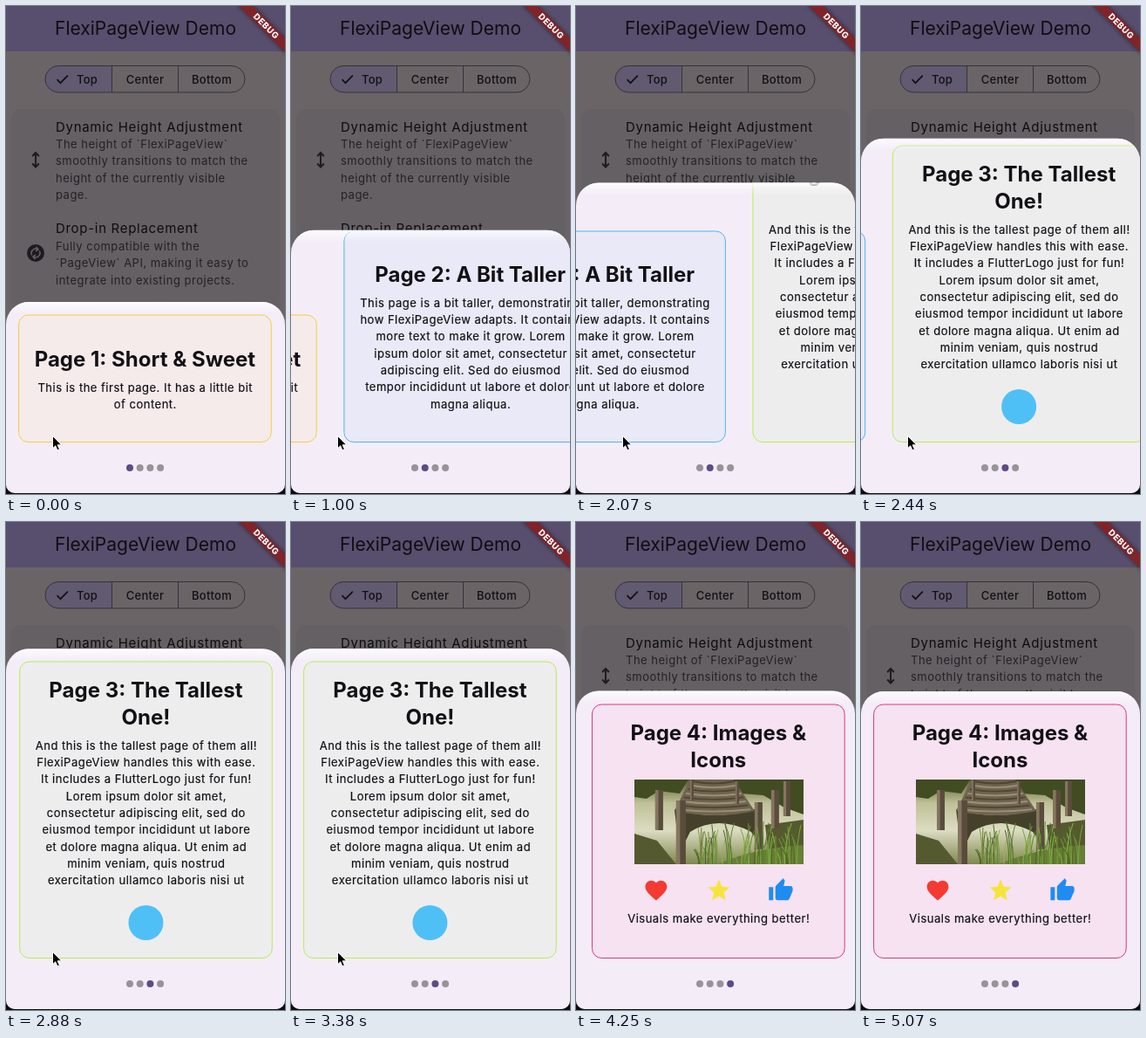
An HTML page for the animation above (5.13 s loop, 320 by 559 pixels).

```html
<!DOCTYPE html>
<html lang="en">
<head>
<meta charset="utf-8">
<title>FlexiPageView Demo</title>
<style>
  html, body { margin: 0; width: 100%; height: 100%; overflow: hidden; background: #0c0b0d; }
  svg { display: block; width: 320px; height: 559px; }
  text { font-family: Inter, Roboto, sans-serif; fill: #131116; }
  .bar { font-size: 21px; fill: #0f0d12; }
  .tab { font-size: 13px; font-weight: 500; letter-spacing: .25px; fill: #111014; }
  .item { font-size: 15px; letter-spacing: .7px; fill: #0d0c0e; }
  .note, .body { font-size: 13px; letter-spacing: .5px; }
  .note { fill: #242126; }
  .body { stroke: #131116; stroke-width: .2; }
  .head { font-size: 24px; font-weight: 700; }
  .mid { text-anchor: middle; }
  .debug { font-size: 9.8px; font-weight: 800; letter-spacing: .5px; fill: #fff; }
</style>
</head>
<body>
<svg viewBox="0 0 320 559">
  <defs>
    <clipPath id="window"><rect y="-20" width="320" height="578" rx="10"/></clipPath>
    <clipPath id="sheetClip"><rect class="sheet" width="320" height="600" rx="26"/></clipPath>
    <clipPath id="photoClip"><rect width="194" height="97"/></clipPath>
    <linearGradient id="pond" x2="0" y2="1">
      <stop offset="0" stop-color="#55622f"/>
      <stop offset=".28" stop-color="#bfc097"/>
      <stop offset=".6" stop-color="#dcdcc2"/>
      <stop offset="1" stop-color="#7f8850"/>
    </linearGradient>
    <linearGradient id="fade" x2="0" y2="1">
      <stop offset="0" stop-color="#fff"/>
      <stop offset=".3" stop-color="#fff" stop-opacity=".5"/>
      <stop offset="1" stop-color="#fff" stop-opacity="0"/>
    </linearGradient>
    <filter id="blur" x="-20%" y="-100%" width="140%" height="300%"><feGaussianBlur stdDeviation="2.8"/></filter>
  </defs>

  <g clip-path="url(#window)">
    <!-- dimmed app behind the sheet -->
    <rect width="320" height="559" fill="#6a6467"/>
    <rect width="320" height="52" fill="#584e6d"/>
    <text class="bar mid" x="160" y="33">FlexiPageView Demo</text>

    <path d="M121.5 68.5H60.5a15.2 15.2 0 0 0 0 30.4h61z" fill="#625a70"/>
    <g fill="none" stroke="#36323a">
      <rect x="45" y="68.5" width="229" height="30.4" rx="15.2"/>
      <path d="M121.5 68.5v30.4M197.5 68.5v30.4"/>
    </g>
    <path d="M58.5 84.2l4 4 8.3-8.6" fill="none" stroke="#111014" stroke-width="1.7"/>
    <text class="tab" x="81" y="88.5">Top</text>
    <text class="tab mid" x="159.5" y="88.5">Center</text>
    <text class="tab mid" x="236" y="88.5">Bottom</text>

    <rect x="6" y="118" width="308" height="460" rx="11" fill="#646063"/>
    <g id="list"></g>
    <path d="M34 168.5v15.5M30.2 172l3.8-4 3.8 4M30.2 180.5l3.8 4 3.8-4" fill="none" stroke="#1d1b20" stroke-width="1.9"/>
    <circle cx="34" cy="283" r="10" fill="#1d1b20"/>
    <g fill="none" stroke="#646063" stroke-width="1.5">
      <path d="M29.7 285.5a5 5 0 0 1 6.8-6.8M38.3 280.5a5 5 0 0 1-6.8 6.8"/>
      <path d="M34.5 276l2.5 2.8-3 2M33.5 290l-2.5-2.8 3-2"/>
    </g>

    <!-- bottom sheet -->
    <rect class="sheet" width="320" height="600" rx="26" fill="#f4edf8"/>
    <g clip-path="url(#sheetClip)">
      <g id="pages"></g>
      <rect class="sheet" width="320" height="14" fill="url(#fade)"/>
    </g>
    <g id="dots"></g>
    <path id="pointer" d="M53.5 492.5v14.3l3.2-3 2.2 5 2.5-1.1-2.2-4.9h4.5z" fill="#000" stroke="#fff"/>

    <g transform="translate(320.8 .8) rotate(45)">
      <rect x="-40" y="26" width="80" height="11.2" fill="#000" opacity=".5" filter="url(#blur)"/>
      <rect x="-40" y="26" width="80" height="11.2" fill="#80242a"/>
      <text class="debug mid" y="35">DEBUG</text>
    </g>
  </g>
</svg>

<script>
const LOOP = 5130, WIDTH = 321.2, CENTER = 159.4, PITCH = 19.35, OMEGA = 8;
const SWIPES = [0.573, 1.894, 3.449];   // start of each swipe, s
const POINTER_END = 4000;
const $ = id => document.getElementById(id);

const lines = (cls, x, y, pitch, rows) => rows.map((row, i) =>
  `<text class="${cls}" x="${x}" y="${y + i * pitch}">${row}</text>`).join('');
const head = (y, ...rows) => lines('head mid', CENTER, y, 31, rows);
const body = (y, ...rows) => lines('body mid', CENTER + .4, y, PITCH, rows);
const icon = (x, y, fill, d) =>
  `<path transform="translate(${x} ${y}) scale(1.24) translate(-12 -12)" fill="${fill}" d="${d}"/>`;

function random(seed) {
  return () => (seed = seed * 16807 % 2147483647) / 2147483647;
}

function photo() {
  const rnd = random(77);
  const post = (x, y, w, h) => `<rect x="${x}" y="${y}" width="${w}" height="${h}" fill="#5a4c3c"/>
    <rect x="${x}" y="${y}" width="${w * .4}" height="${h}" fill="#85765f"/>`;
  let planks = '', grass = '';
  for (let i = 0; i < 8; i++) {
    const y = 2 + i * 4.6, half = 24 + i * 2.6;
    planks += `<path d="M${91 - half} ${y}q${half} 5 ${half * 2} 0" stroke="${i % 2 ? '#9b917a' : '#51462f'}"/>`;
  }
  for (let i = 0; i < 75; i++) {
    const x = 74 + rnd() * 120, h = 14 + rnd() * 38, lean = rnd() * 18 - 9;
    grass += `<path d="M${x} 99q0 ${-h * .6} ${lean} ${-h}" stroke="hsl(${74 + rnd() * 18} 45% ${24 + rnd() * 26}%)"/>`;
  }
  return `<g transform="translate(63 295)" clip-path="url(#photoClip)">
    <rect width="194" height="97" fill="url(#pond)"/>
    <path d="M0 0h62L52 16 28 13 14 22 0 20zM112 0h82v40l-22-8-24-14-26-2z" fill="#414c22"/>
    <path d="M0 62l26 8 22 27H0zM150 52l44-6v40h-40z" fill="#55592f"/>
    <path d="M46 34q46 14 92 0l8 44-12-18q-38-20-70 0L52 84z" fill="#45402a"/>
    <path d="M64 0h50l24 36q-44 10-92 0z" fill="#6f6450"/>
    <g fill="none" stroke-width="1.8">${planks}</g>
    ${post(24, 12, 9, 46)}${post(48, 24, 11, 73)}${post(64, 0, 4, 24)}
    ${post(116, 2, 4, 26)}${post(138, 26, 9, 54)}${post(157, 12, 9, 44)}${post(171, 2, 8, 40)}
    <path d="M96 97q40-18 98-22v22z" fill="#687d36"/>
    <g fill="none">${grass}</g>
  </g>`;
}

const HEART = 'M12 21.35l-1.45-1.32C5.4 15.36 2 12.28 2 8.5 2 5.42 4.42 3 7.5 3c1.74 0 3.41.81 4.5 2.09C13.09 3.81 14.76 3 16.5 3 19.58 3 22 5.42 22 8.5c0 3.78-3.4 6.86-8.55 11.54z';
const STAR = 'M12 17.27L18.18 21l-1.64-7.03L22 9.24l-7.19-.61L12 2 9.19 8.63 2 9.24l5.46 4.73L5.82 21z';
const THUMB = 'M1 21h4V9H1zM23 10c0-1.1-.9-2-2-2h-6.31l.95-4.57.03-.32c0-.41-.17-.79-.44-1.06L14.17 1 7.59 7.59C7.22 7.95 7 8.45 7 9v10c0 1.1.9 2 2 2h9c.83 0 1.54-.5 1.84-1.22l3.02-7.05c.09-.23.14-.47.14-.73z';

const PAGES = [
  { top: 354, fill: '#f5ebea', edge: '#f3cd45', content:
    head(413, 'Page 1: Short &amp; Sweet') +
    body(441.5, 'This is the first page. It has a little bit', 'of content.') },
  { top: 258, fill: '#e9e9f7', edge: '#4fb5ea', content:
    head(315.5, 'Page 2: A Bit Taller') +
    body(344.5, 'This page is a bit taller, demonstrating', 'how FlexiPageView adapts. It contains',
      'more text to make it grow. Lorem', 'ipsum dolor sit amet, consectetur',
      'adipiscing elit. Sed do eiusmod', 'tempor incididunt ut labore et dolore', 'magna aliqua.') },
  { top: 160, fill: '#eeedee', edge: '#b3ef52', content:
    head(201, 'Page 3: The Tallest', 'One!') +
    body(260.5, 'And this is the tallest page of them all!', 'FlexiPageView handles this with ease.',
      'It includes a FlutterLogo just for fun!', 'Lorem ipsum dolor sit amet,',
      'consectetur adipiscing elit, sed do', 'eiusmod tempor incididunt ut labore',
      'et dolore magna aliqua. Ut enim ad', 'minim veniam, quis nostrud',
      'exercitation ullamco laboris nisi ut') +
    `<circle cx="${CENTER}" cy="459" r="20" fill="#4fc0f6"/>` },
  { top: 209, fill: '#f6e2f1', edge: '#e0357f', content:
    head(249.5, 'Page 4: Images &amp;', 'Icons') + photo() +
    icon(88, 422, '#f43a31', HEART) + icon(160, 422, '#f6e43b', STAR) + icon(231, 422, '#1f8cf1', THUMB) +
    body(458.5, 'Visuals make everything better!') },
];

$('pages').innerHTML = PAGES.map((p, i) => `<g transform="translate(${i * WIDTH} 0)">
  <rect x="${CENTER - 144.8}" y="${p.top}" width="289.6" height="${499.5 - p.top}" rx="11" fill="${p.fill}" stroke="${p.edge}"/>
  ${p.content}</g>`).join('');

$('list').innerHTML =
  lines('item', 57, 143.5, 0, ['Dynamic Height Adjustment']) +
  lines('note', 57, 163, PITCH, ['The height of `FlexiPageView`', 'smoothly transitions to match the',
    'height of the currently visible', 'page.']) +
  lines('item', 57, 259.5, 0, ['Drop-in Replacement']) +
  lines('note', 57, 280, PITCH, ['Fully compatible with the', '`PageView` API, making it easy to',
    'integrate into existing projects.']);

$('dots').innerHTML = PAGES.map((p, i) => `<circle cx="${142 + i * 11.7}" cy="529" r="4"/>`).join('');

const sheets = document.querySelectorAll('.sheet');
const dots = [...$('dots').children];

// Critically damped spring from 0 to 1.
const spring = t => t <= 0 ? 0 : 1 - (1 + OMEGA * t) * Math.exp(-OMEGA * t);

function draw() {
  const ms = performance.now() % LOOP;
  const pos = SWIPES.reduce((sum, start) => sum + spring(ms / 1000 - start), 0);
  const i = Math.min(Math.floor(pos), 2);
  const top = PAGES[i].top + (PAGES[i + 1].top - PAGES[i].top) * (pos - i) - 15;
  sheets.forEach(s => s.setAttribute('y', top));
  $('pages').setAttribute('transform', `translate(${-pos * WIDTH} 0)`);
  dots.forEach((d, n) => d.setAttribute('fill', n === Math.round(pos) ? '#5d4a86' : '#989299'));
  $('pointer').style.display = ms < POINTER_END ? '' : 'none';
  requestAnimationFrame(draw);
}
draw();
</script>
</body>
</html>
```
